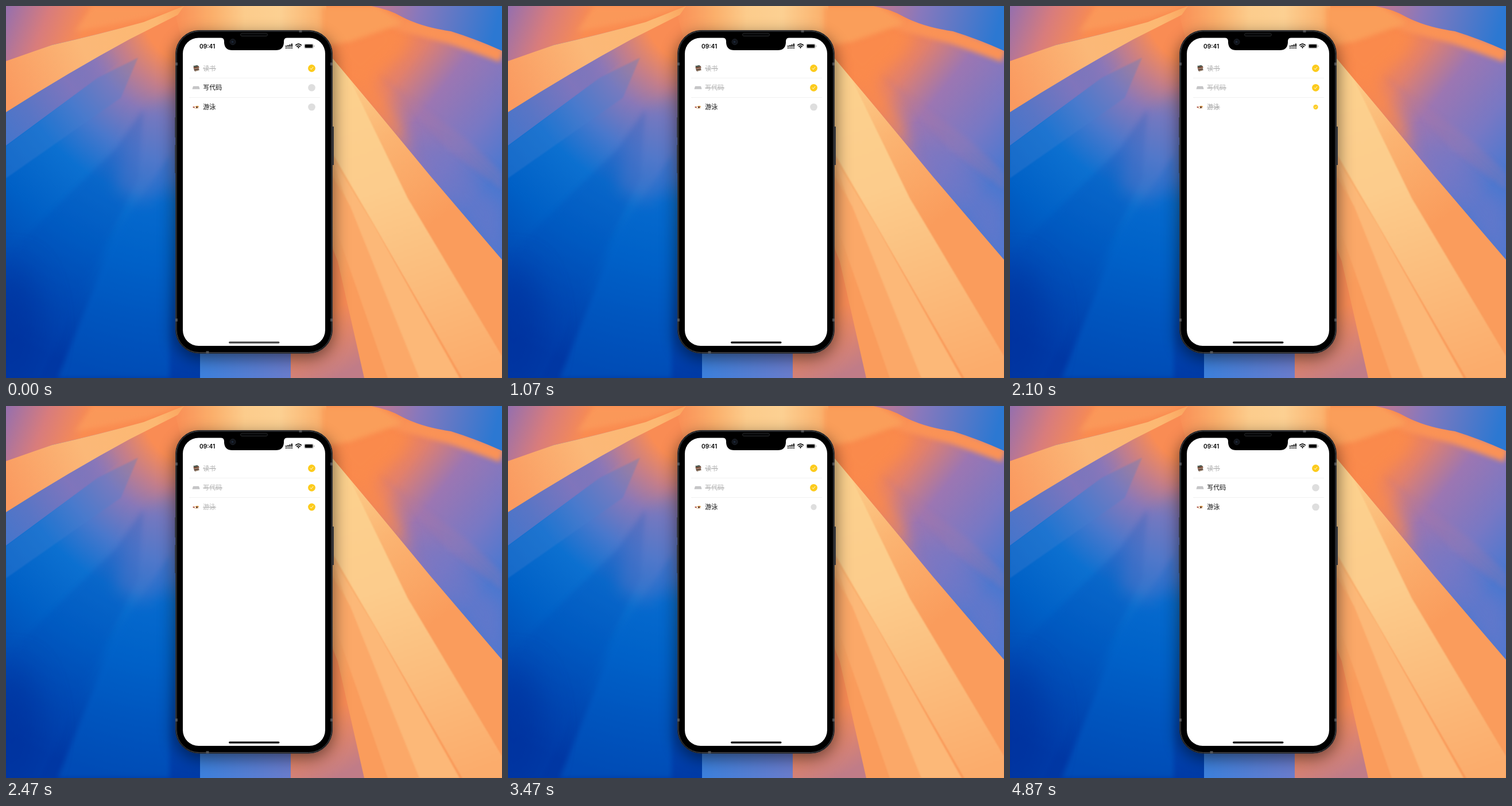
An HTML page for the animation above (4.93 s loop, 864 px wide and 648 px high).

```html
<!DOCTYPE html>
<html lang="zh-CN">
<head>
<meta charset="utf-8">
<style>
html, body { margin: 0; width: 100%; height: 100%; overflow: hidden; background: #0058c0; }
svg { display: block; }
.s1 { filter: blur(1px); }
.s4 { filter: blur(4px); }
.s14 { filter: blur(14px); }
.s28 { filter: blur(28px); }
.label { font: 500 11px "Noto Sans CJK SC", "Noto Sans CJK", sans-serif; }
.clock { font: 600 10.2px Inter, sans-serif; }
</style>
</head>
<body>
<svg width="864" height="648" viewBox="0 0 864 648">
<defs>
  <radialGradient id="blue" gradientUnits="userSpaceOnUse" cx="330" cy="10" r="650">
    <stop offset=".14" stop-color="#f98c54"/><stop offset=".22" stop-color="#c47e8a"/>
    <stop offset=".3" stop-color="#8a78b8"/><stop offset=".41" stop-color="#4a78cc"/>
    <stop offset=".52" stop-color="#0c70d0"/><stop offset=".68" stop-color="#0060c6"/>
    <stop offset=".86" stop-color="#0048b2"/><stop offset="1" stop-color="#0038a4"/>
  </radialGradient>
  <linearGradient id="violet" gradientUnits="userSpaceOnUse" x1="0" y1="230" x2="190" y2="80">
    <stop offset="0" stop-color="#5878ca"/><stop offset=".6" stop-color="#8a74b8"/>
    <stop offset="1" stop-color="#8a74b8" stop-opacity="0"/>
  </linearGradient>
  <linearGradient id="band" gradientUnits="userSpaceOnUse" x1="0" y1="150" x2="310" y2="10">
    <stop offset="0" stop-color="#fa9a60"/><stop offset=".45" stop-color="#fbb878"/>
    <stop offset=".85" stop-color="#fcb872"/><stop offset="1" stop-color="#fba660"/>
  </linearGradient>
  <linearGradient id="corner" gradientUnits="userSpaceOnUse" x1="0" y1="10" x2="130" y2="60">
    <stop offset="0" stop-color="#9870ac"/><stop offset=".5" stop-color="#d87c7c"/>
    <stop offset="1" stop-color="#fa8c50"/>
  </linearGradient>
  <linearGradient id="top" gradientUnits="userSpaceOnUse" x1="290" y1="0" x2="650" y2="0">
    <stop offset="0" stop-color="#f98c54"/><stop offset=".2" stop-color="#fbb06c"/>
    <stop offset=".35" stop-color="#fccc8c"/><stop offset=".52" stop-color="#fcd092"/>
    <stop offset=".7" stop-color="#fbb470"/><stop offset="1" stop-color="#fa9a56"/>
  </linearGradient>
  <linearGradient id="dusk" gradientUnits="userSpaceOnUse" x1="610" y1="110" x2="850" y2="300">
    <stop offset="0" stop-color="#f9854c"/><stop offset=".22" stop-color="#e2806c"/>
    <stop offset=".45" stop-color="#9c76b2"/><stop offset=".75" stop-color="#7878c4"/>
    <stop offset="1" stop-color="#4c78d0"/>
  </linearGradient>
  <linearGradient id="sky" gradientUnits="userSpaceOnUse" x1="660" y1="0" x2="850" y2="50">
    <stop offset="0" stop-color="#b87898"/><stop offset=".3" stop-color="#8878bc"/>
    <stop offset="1" stop-color="#2c78d2"/>
  </linearGradient>
  <linearGradient id="slope" gradientUnits="userSpaceOnUse" x1="590" y1="110" x2="770" y2="360">
    <stop offset="0" stop-color="#fcd08c"/><stop offset=".45" stop-color="#fbb472"/>
    <stop offset="1" stop-color="#fa9c5c"/>
  </linearGradient>
  <linearGradient id="sand" gradientUnits="userSpaceOnUse" x1="590" y1="90" x2="790" y2="648">
    <stop offset="0" stop-color="#fcd28e"/><stop offset=".4" stop-color="#fccc8c"/>
    <stop offset="1" stop-color="#fbac6c"/>
  </linearGradient>
  <linearGradient id="foot" gradientUnits="userSpaceOnUse" x1="338" y1="0" x2="495" y2="0">
    <stop offset="0" stop-color="#3c80dc"/><stop offset="1" stop-color="#6a7ccc"/>
  </linearGradient>
  <linearGradient id="rose" gradientUnits="userSpaceOnUse" x1="510" y1="560" x2="560" y2="655">
    <stop offset="0" stop-color="#f98c56"/><stop offset="1" stop-color="#c07c88"/>
  </linearGradient>
  <clipPath id="duskClip"><path d="M558 78L650 188L740 297L864 442V0H558Z"/></clipPath>
</defs>

<!-- wallpaper, left -->
<rect width="500" height="648" fill="url(#blue)"/>
<path d="M0 185Q110 115 215 58L300 20L160 125L0 243Z" fill="url(#violet)" opacity=".8"/>
<path class="s1" d="M0 243L160 125L230 90L200 160L0 300Z" fill="#4880d0" opacity=".3"/>
<path class="s4" d="M0 435L190 250L240 180L230 300L60 648H0Z" fill="#0048b4" opacity=".22"/>
<path class="s4" d="M90 648L190 400L285 260V648Z" fill="#0064cc" opacity=".45"/>
<path class="s14" d="M300 150L225 190L190 320L240 345L300 300Z" fill="#5a78c8" opacity=".45"/>
<ellipse class="s28" cx="10" cy="560" rx="50" ry="110" fill="#002c98" opacity=".5"/>
<path d="M0 0H310L240 28Q160 50 80 68L0 98Z" fill="url(#corner)"/>
<path class="s4" d="M150 0H310L240 22L120 45Z" fill="#fba060" opacity=".6"/>
<path d="M0 96L80 68Q160 50 240 28L310 0V10L215 58Q110 115 0 185Z" fill="url(#band)"/>
<path d="M338 590H496V648H338Z" fill="url(#foot)"/>

<!-- wallpaper, right -->
<path d="M496 60H864V648H496Z" fill="#fa9c5c"/>
<path d="M310 0H650V110H320L296 20Z" fill="url(#top)"/>
<path d="M555 60L650 188L740 297L864 442V648H622L565 400Z" fill="url(#slope)"/>
<path class="s1" d="M560 70L600 130L700 335L864 610V648H795L640 380L565 250Z" fill="url(#sand)"/>
<path class="s1" d="M565 260L640 380L790 648H715L590 330Z" fill="#fcb878"/>
<path class="s1" d="M565 290L600 350L720 648H665L565 360Z" fill="#fba868"/>
<path d="M496 590L560 400L578 445L624 648H496Z" fill="url(#rose)"/>
<g clip-path="url(#duskClip)">
  <path d="M550 0H864V450H550Z" fill="url(#dusk)"/>
  <path class="s14" d="M540 0H650L710 50L690 85L640 130L690 220L700 260L550 80Z" fill="#fa8a4c"/>
  <path class="s14" d="M700 225L755 250L864 350V450L750 310Z" fill="#7478c6" opacity=".5"/>
  <path class="s4" d="M650 120L800 230L864 290V320L770 250Z" fill="#b078a0" opacity=".2"/>
  <path class="s4" d="M640 10L690 32L775 54L864 86" fill="none" stroke="#fa9256" stroke-width="24"/>
</g>
<path class="s4" d="M550 0H645L690 30L600 62L550 70Z" fill="#fa9e5a"/>
<path d="M636 0Q668 6 690 19Q725 37 775 44Q820 58 864 78V0Z" fill="url(#sky)"/>

<!-- phone -->
<rect class="s14" x="293" y="50" width="278" height="564" rx="44" opacity=".5"/>
<path d="M570 210V277" stroke="#303238" stroke-width="2"/>
<path d="M294.800 194V229M294.800 242V291" stroke="#303238"/>
<rect x="295.500" y="42.500" width="273" height="562.500" rx="41" fill="#000" stroke="#34363a"/>
<rect x="297" y="44" width="270" height="559.500" rx="39.500" fill="none" stroke="#4c4e53"/>
<path d="M295 101H299M565 101H569M295 547H299M565 547H569M513 42V46M351 601V605" stroke="#66686c" stroke-width="5" opacity=".7"/>
<rect x="308" y="55.500" width="248" height="536.500" rx="27.500" fill="#fff"/>
<path d="M374 55H490Q484.500 55.500 484 61V64Q483 77 470 77H394Q381 77 380 64V61Q379.500 55.500 374 55Z"/>
<rect x="408.500" y="47.500" width="47" height="5" rx="2.500" fill="#08090a" stroke="#252628"/>
<circle cx="395" cy="62.500" r="5" fill="#101319" stroke="#1d2129"/>
<circle cx="394.500" cy="62.500" r="1.800" fill="#1c2838"/>
<text class="clock" x="337" y="73.800">09:41</text>
<path d="M488 71V69M491.300 71V68M494.600 71V67M497.900 71V65.500M488 74V72.300M491.300 74V72.300M494.600 74V72.300M497.900 74V72.300" stroke="#111" stroke-width="2.200"/>
<g fill="none" stroke="#000" stroke-width="1.700">
  <path d="M504.200 68.600Q509.500 63.800 514.800 68.600M506.200 70.800Q509.500 67.800 512.800 70.800"/>
  <path d="M507.700 71.900Q509.500 70.600 511.300 71.900L509.500 74Z" fill="#000" stroke="none"/>
</g>
<rect x="519.500" y="66" width="16" height="7.800" rx="2.300" fill="none" stroke="#aaa" stroke-width=".8"/>
<rect x="520.700" y="67.100" width="13.600" height="5.600" rx="1.300"/>
<path d="M537 68.500V71.300" stroke="#aaa"/>
<path d="M319 125.500H547M319 159.500H547" stroke="#f1f1f1"/>
<g id="list"></g>
<rect id="home" x="388" y="584.500" width="88.500" height="3.200" rx="1.600"/>
</svg>

<script>
const LOOP = 4930;
const books = `<path d="M-5-4L2-5.500 5-3.500-3-1Z" fill="#4a5a50"/><path d="M-5-1.500L5-3.500 5.500-.5-3 1.500Z" fill="#7a4a38"/>
  <path d="M-4 1.500L5 0 5.500 3.500-2 5.500Z" fill="#584038"/><path d="M-3 1.200L5-.6M-2 4.500L5 2.600" stroke="#d8c4a0" stroke-width=".8"/>`;
const keyboard = `<path d="M-5-2.500H5L6.500 2.500H-6.500Z" fill="#bcbcbe"/>
  <path d="M-5-1H5M-5.500 1H5.500" stroke="#dcdcde" stroke-width=".8" stroke-dasharray="1.200 .6"/>`;
const swimmer = `<path d="M-2-.5Q1-3.500 5.500-1L3 1 0 0Z" fill="#e0a050"/><circle cx="1.500" cy=".6" r="1.600" fill="#593528"/>
  <path d="M-6-.3L-3-1-2 1-4.500 1.400Z" fill="#a84a38"/><path d="M-3 2Q0 3.300 5 1.300" fill="none" stroke="#e7c9a8" stroke-width="1.200"/>`;

// `on` and `off` are the times at which a row is ticked and cleared.
const rows = [
  { text: "读书", icon: books, y: 108.5, on: -1e4, off: 1e6 },
  { text: "写代码", icon: keyboard, y: 142.3, on: 700, off: 4560 },
  { text: "游泳", icon: swimmer, y: 176, on: 2000, off: 3330 }
];
const list = document.getElementById("list");
const home = document.getElementById("home");

list.innerHTML = rows.map(r => `<g transform="translate(0 ${r.y})">
  <g transform="translate(331 0)">${r.icon}</g>
  <text class="label" x="343.300" y="4">${r.text}</text>
  <path class="strike" d="M343 .5h${r.text.length * 11 + 1}" stroke="#aaa" stroke-width=".9"/>
  <circle class="empty" r="6.300" fill="#dedede"/>
  <g class="tick"><circle r="6.400" fill="#fccb1c"/>
    <path d="M-2.400 .2L-.8 2 2.400-2" fill="none" stroke="#fff" stroke-width=".9" stroke-linecap="round"/></g>
</g>`).join("");

rows.forEach((r, i) => {
  for (const name of ["label", "strike", "empty", "tick"])
    r[name] = list.children[i].querySelector("." + name);
});

const clamp = x => Math.max(0, Math.min(1, x));
const easeOut = x => 1 - (1 - clamp(x)) ** 2;

function show(el, amount) {
  el.setAttribute("transform", `translate(532.500 0) scale(${0.5 + amount / 2})`);
  el.setAttribute("opacity", clamp(amount * 3));
}

function draw(t) {
  for (const r of rows) {
    const done = t >= r.on && t < r.off;
    const age = t < r.on ? 1e4 : t - (done ? r.on : r.off);
    const fade = clamp(age / 120);
    const grey = done ? fade : 1 - fade;
    const shade = Math.round(10 + grey * 168);
    r.label.setAttribute("fill", `rgb(${shade},${shade},${shade})`);
    r.strike.setAttribute("opacity", grey);
    show(done ? r.tick : r.empty, easeOut((age - 70) / 180));
    show(done ? r.empty : r.tick, 1 - clamp(age / 100));
  }
  const tone = Math.round(70 * (1 - clamp(t / 300)));
  home.setAttribute("fill", `rgb(${tone},${tone},${tone})`);
}

const start = performance.now();
function tick() {
  draw((performance.now() - start) % LOOP);
  requestAnimationFrame(tick);
}
tick();
</script>
</body>
</html>
```
